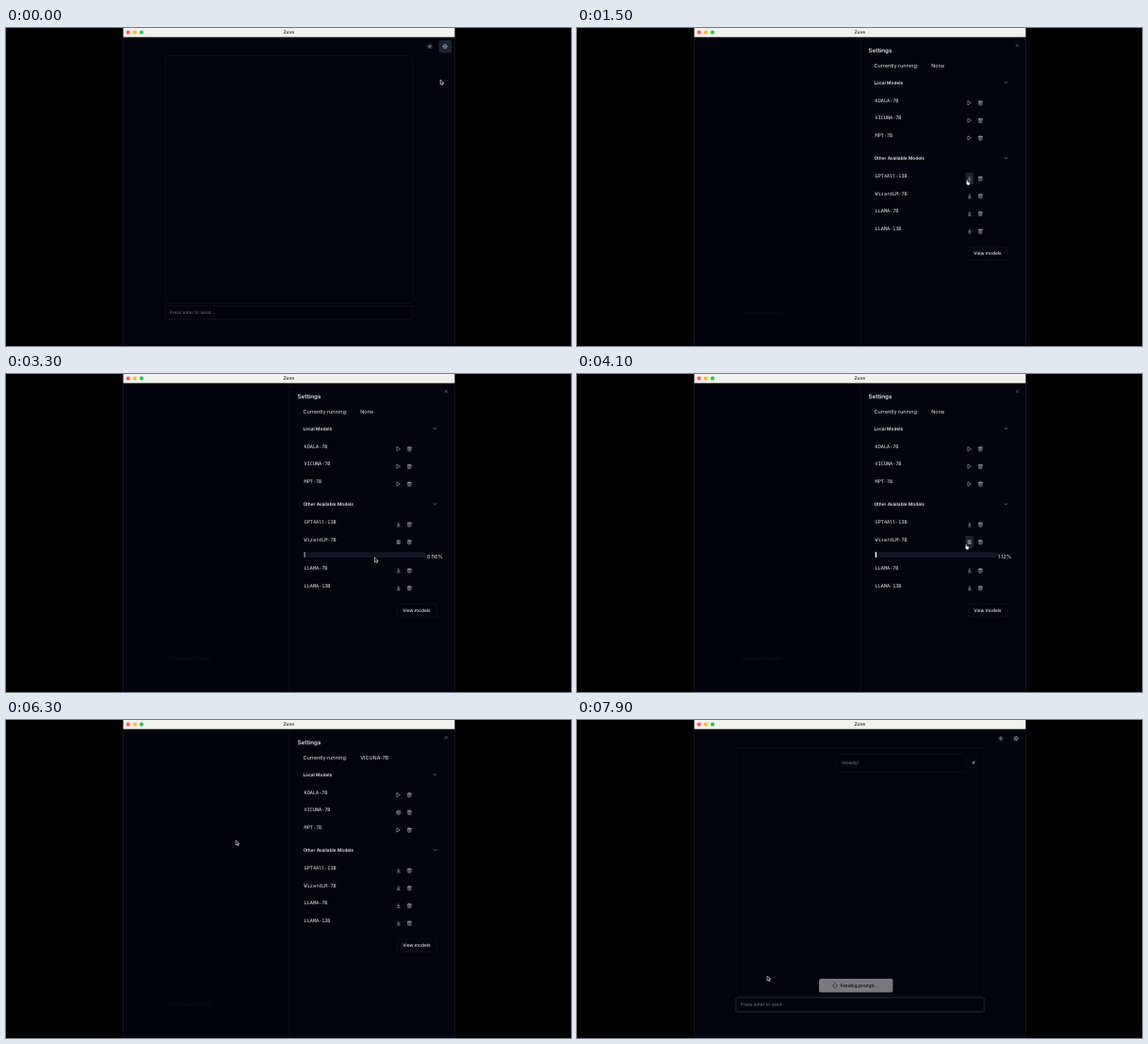
Write an HTML page that moves like this. It is 600 by 338 pixels and loops after 8 s.

```html
<!DOCTYPE html>
<html lang="en">
<head>
<meta charset="utf-8">
<title>Model chat</title>
<style>
  html, body { margin: 0; width: 100%; height: 100%; overflow: hidden; background: #000; }
  svg { display: block; width: 100vw; height: 100vh; }
  text { font-family: Inter, "Open Sans", sans-serif; font-size: 4.81px; fill: #e8ecf2; text-rendering: geometricPrecision; }
  .mono { font-family: "DejaVu Sans Mono", monospace; font-size: 5.15px; }
  .base { font-size: 5.5px; }
  .medium { font-weight: 500; }
  .bold { font-weight: 600; }
  .icon { fill: none; stroke: #dfe4ec; stroke-width: 2; stroke-linecap: round; stroke-linejoin: round; }
</style>
</head>
<body>
<svg id="stage" viewBox="0 0 600 338"></svg>
<script>
const LOOP = 8000, STEP = 100;
const BG = '#01030d', LINE = '#111722', HOVER = '#1b2230';
const stage = document.getElementById('stage');

const clamp = v => Math.max(0, Math.min(1, v));
const progress = (t, start, length) => clamp((t - start) / length);
const easeOut = p => 1 - (1 - p) ** 3;
const smooth = p => p * p * (3 - 2 * p);

function gearPath() {
  const points = [];
  for (let i = 0; i < 32; i++) {
    const radius = i % 4 < 2 ? 10 : 7.6;
    const angle = (i - 0.5) * Math.PI / 16;
    points.push(`${(12 + radius * Math.cos(angle)).toFixed(2)} ${(12 + radius * Math.sin(angle)).toFixed(2)}`);
  }
  return `M${points.join('L')}Z`;
}

function sunRays() {
  let path = '';
  for (let i = 0; i < 8; i++) {
    const c = Math.cos(i * Math.PI / 4), s = Math.sin(i * Math.PI / 4);
    path += `M${12 + 8 * c} ${12 + 8 * s}L${12 + 10 * c} ${12 + 10 * s}`;
  }
  return path;
}

const circle = r => `M${12 - r} 12a${r} ${r} 0 1 0 ${2 * r} 0a${r} ${r} 0 1 0 ${-2 * r} 0`;

// Icon outlines on a 24-unit grid.
const ICONS = {
  play: 'M5 3L19 12L5 21Z',
  pause: 'M6 4h4v16h-4zM14 4h4v16h-4z',
  stop: circle(10) + 'M9 9h6v6h-6z',
  download: 'M12 3v13M7 11l5 5 5-5M5 21h14',
  trash: 'M3 6h18M19 6v14q0 2-2 2H7q-2 0-2-2V6M8 6V4q0-2 2-2h4q2 0 2 2v2M10 11v6M14 11v6',
  chevron: 'M6 9l6 6 6-6',
  close: 'M18 6L6 18M6 6l12 12',
  gear: gearPath() + circle(3),
  sun: circle(4) + sunRays(),
  loader: circle(9),
  send: 'M21 3L14 21L10 14L3 10Z'
};

const icon = (name, x, y, size = 5.5, style = '') =>
  `<path class="icon" d="${ICONS[name]}" transform="translate(${x - size / 2} ${y - size / 2}) scale(${size / 24})" style="${style}"/>`;
const text = (x, y, value, cls = '', fill = '#e8ecf2') =>
  `<text x="${x}" y="${y}" class="${cls}" style="fill:${fill}">${value}</text>`;
const rect = (x, y, w, h, fill, extra = '') =>
  `<rect x="${x}" y="${y}" width="${w}" height="${h}" fill="${fill}" ${extra}/>`;
const outline = (x, y, w, h, stroke = LINE, radius = 1.8) =>
  rect(x, y, w, h, 'none', `rx="${radius}" stroke="${stroke}" stroke-width=".6"`);

// Pointer keys: time, tip x, tip y.
const POINTER = [
  [0, 461.2, 55], [200, 455, 70], [800, 424, 142], [1300, 414.4, 161.3], [1700, 414.4, 161.3],
  [1900, 415, 179], [2100, 415, 179], [2500, 391.5, 195], [3700, 391.5, 195],
  [4000, 413.3, 180.8], [4600, 413.3, 180.8], [5000, 406.5, 105], [5300, 415, 98],
  [5800, 415, 98], [6300, 244, 128], [6500, 243, 130], [6900, 203, 300], [7400, 203, 300],
  [7900, 202, 272]
];

function pointerAt(t) {
  const i = POINTER.findIndex(key => key[0] > t);
  if (i < 0) return POINTER[POINTER.length - 1].slice(1);
  const [t0, x0, y0] = POINTER[i - 1], [t1, x1, y1] = POINTER[i];
  const p = smooth((t - t0) / (t1 - t0));
  return [x0 + (x1 - x0) * p, y0 + (y1 - y0) * p];
}

function pointer(t, hand) {
  const [x, y] = pointerAt(t);
  const beam = t > 6600 && y > 294;
  const shape = beam
    ? '<path d="M-1 -2.5h2M0 -2.5v5M-1 2.5h2" stroke="#d8dbe0" stroke-width=".5"/>'
    : hand
      ? '<path d="M-.5 .5q.5-.7 1 0v1.6l2 .5q.6.3.4 1l-.5 2H.2L-1.4 3.3q0-.8.9-.2z" fill="#fff" stroke="#222" stroke-width=".3"/>'
      : '<path d="M0 0v5l1.2-1.1 .8 1.8 1-.4-.8-1.8h1.6z" fill="#0a0a0a" stroke="#f4f4f4" stroke-width=".6"/>';
  return `<g transform="translate(${x} ${y})">${shape}</g>`;
}

function windowFrame() {
  const lights = ['#fe5f57', '#febc2e', '#28c840']
    .map((color, i) => `<circle cx="${129.7 + i * 7.1}" cy="4.7" r="2.1" fill="${color}"/>`).join('');
  return rect(124.5, 0, 352, 9.7, '#f1f1ee') + lights +
    '<text x="300.3" y="6.4" text-anchor="middle" class="bold" style="fill:#303030">Zuve</text>' +
    '<path d="M124.5 9.7V338M476.5 9.7V338" stroke="#1b2029" stroke-width=".6"/>';
}

function chat(t) {
  const typed = 'Howdy!'.slice(0, Math.floor(progress(t, 7100, 500) * 6));
  const typing = t < 7700 && typed;
  const focused = t >= 7000;
  let out = icon('sun', 450, 19.7);
  if (t < 100) out += rect(459.5, 13, 13.7, 13.5, HOVER, 'rx="1.8"');
  out += icon('gear', 466.2, 19.7) + outline(169.2, 29.7, 262.8, 262.8);
  out += outline(169.2, 295.6, 262.8, 14, focused ? '#1c2430' : '#161c27');
  if (focused) out += outline(168.3, 294.7, 264.6, 15.8, '#28303c', 2.4);
  out += text(173.6, 304.4, typing || 'Press enter to send...', '', typing ? '#e8ecf2' : '#737a86');
  if (t >= 7700) {
    out += outline(275.8, 36, 137.2, 19) + text(281.8, 47.2, 'Howdy!', '', '#818690');
    out += icon('send', 420.8, 45.5, 4.2, 'fill:#aeb3bc;stroke:#aeb3bc;stroke-width:1');
    out += `<g opacity="${0.48 * progress(t, 7600, 300)}">` + rect(257, 275, 78.4, 14.5, '#f8fafc', 'rx="1.8"') +
      icon('loader', 274, 282.3, 5.5, 'stroke:#05070d;stroke-dasharray:4 3') +
      text(279.4, 284, 'Feeding prompt...', 'medium', '#03050b') + '</g>';
  }
  return out;
}

function panel(t, hovered) {
  const downloading = t >= 2100 && t < 4700;
  const running = t >= 5600;
  const shift = downloading ? 11.6 : 0;

  const row = (name, y, action) =>
    text(316.6, y - 0.9, name, 'mono') +
    (hovered === name ? rect(412.5, y - 6.6, 8.7, 13.2, HOVER, 'rx="1.8"') : '') +
    icon(action, 416.9, y) + icon('trash', 428.4, y);
  const heading = (y, label) => text(315.4, y + 1.7, label, 'bold') + icon('chevron', 455.5, y);

  let out = rect(301, 9.7, 175.5, 329, BG) +
    '<path d="M301 9.7V338" stroke="#151b26" stroke-width=".6"/>' +
    '<text x="309.6" y="25.7" class="bold" style="font-size:6.19px">Settings</text>' +
    icon('close', 467.5, 18.6, 5.5, 'stroke:#9ba0a9') +
    text(315.4, 42.3, 'Currently running:', 'base') +
    text(376.2, 42.3, running ? 'VICUNA-7B' : 'None', 'base');

  out += heading(58, 'Local Models');
  ['KOALA-7B', 'VICUNA-7B', 'MPT-7B'].forEach((name, i) =>
    out += row(name, 79.6 + i * 18.65, running && i === 1 ? 'stop' : 'play'));

  out += heading(138.3, 'Other Available Models');
  ['GPT4All-13B', 'WizardLM-7B', 'LLAMA-7B', 'LLAMA-13B'].forEach((name, i) =>
    out += row(name, 160 + i * 18.65 + (i > 1 ? shift : 0), downloading && i === 1 ? 'pause' : 'download'));

  if (downloading) {
    const percent = 1.12 * Math.max(0, Math.min(t, 4400) - 2500) / 1600;
    out += rect(316.7, 189.2, 129.3, 5.7, '#111722', 'rx=".8"') +
      rect(316.7, 189.2, 1.293 * percent, 5.7, '#f8fafc') +
      text(447, 195.7, percent.toFixed(2) + '%', 'base');
  }
  return out + outline(415.3, 232.8 + shift, 42.2, 13.6, '#161c27') +
    text(421.2, 241.3 + shift, 'View models', 'medium');
}

function hoveredModel(t) {
  if (t >= 1200 && t < 1800) return 'GPT4All-13B';
  if (t >= 1800 && t < 2300 || t >= 3900 && t < 4700) return 'WizardLM-7B';
  if (t >= 5200 && t < 5900) return 'VICUNA-7B';
  return '';
}

function draw(t) {
  const hovered = hoveredModel(t);
  const open = easeOut(progress(t, 0, 400));
  const visible = 1 - progress(t, 6400, 200);
  const showPanel = t >= 100 && visible > 0;
  let out = rect(0, 0, 600, 338, '#000') + rect(124.5, 9.7, 352, 329, BG);
  out += showPanel ? `<g style="filter:blur(${open * visible}px)">${chat(t)}</g>` : chat(t);
  if (showPanel) {
    out += rect(124.5, 9.7, 352, 329, BG, `opacity="${0.82 * open * visible}"`) +
      `<g clip-path="url(#view)" opacity="${visible}"><g transform="translate(${175.5 * (1 - open)} 0)">${panel(t, hovered)}</g></g>`;
  }
  stage.innerHTML = '<defs><clipPath id="view"><path d="M124.5 9.7h352V338h-352z"/></clipPath></defs>' +
    out + windowFrame() + pointer(t, hovered);
}

const began = performance.now();
let shown = -1;
function tick(now) {
  const t = Math.floor((Math.max(0, now - began) % LOOP) / STEP) * STEP;
  if (t !== shown) draw(shown = t);
  requestAnimationFrame(tick);
}
tick(began);
</script>
</body>
</html>
```
